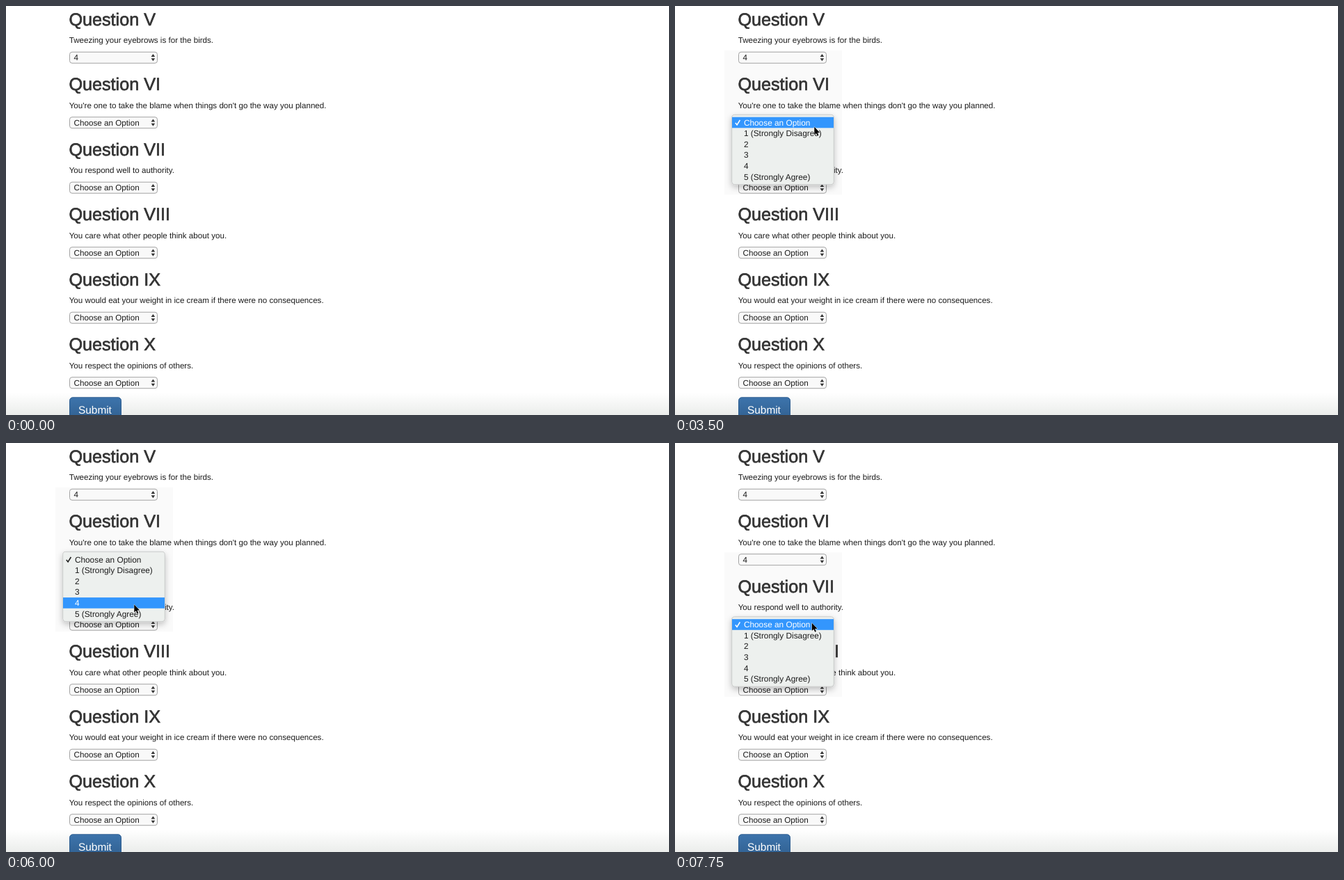
Write an HTML page that moves like this. It is 953 by 588 pixels and loops after 8 s.

```html
<!DOCTYPE html>
<html lang="en">
<head>
<meta charset="utf-8">
<title>Questionnaire</title>
<style>
  html, body { margin: 0; width: 100%; height: 100%; overflow: hidden; background: #fff; }
  svg { display: block; width: 100vw; height: 100vh; }
  text {
    font: 11.63px "Liberation Sans", Arial, sans-serif;
    fill: #1c1c1c; text-rendering: geometricPrecision; white-space: pre;
  }
  .head { font-size: 25.2px; fill: #333; stroke: #333; stroke-width: .7px; }
  .value { font-size: 11.7px; }
  .item { font-size: 11.85px; }
  .submit { font-size: 15.4px; fill: #fff; }
</style>
</head>
<body>
<svg id="stage" viewBox="0 0 953 588" preserveAspectRatio="none">
  <defs>
    <linearGradient id="fade" x1="0" y1="0" x2="0" y2="1">
      <stop offset="0" stop-color="#fff"/>
      <stop offset="1" stop-color="#ebedeb"/>
    </linearGradient>
    <linearGradient id="blue" x1="0" y1="0" x2="0" y2="1">
      <stop offset="0" stop-color="#3d74ac"/>
      <stop offset="1" stop-color="#2e5c8b"/>
    </linearGradient>
    <filter id="shadow" x="-20%" y="-20%" width="140%" height="150%">
      <feDropShadow dx="0" dy="3.5" stdDeviation="4" flood-opacity=".24"/>
    </filter>
  </defs>
</svg>
<script>
const LOOP = 8000, TICK = 250;
const PITCH = 93.5, ITEM = 15.6, LIST_TOP = 66.2;
const CHOOSE = "Choose an Option";
const stage = document.getElementById("stage");

const questions = [
  ["V", "Tweezing your eyebrows is for the birds."],
  ["VI", "You're one to take the blame when things don't go the way you planned."],
  ["VII", "You respond well to authority."],
  ["VIII", "You care what other people think about you."],
  ["IX", "You would eat your weight in ice cream if there were no consequences."],
  ["X", "You respect the opinions of others."]
];
const options = [CHOOSE, "1 (Strongly Disagree)", "2", "3", "4", "5 (Strongly Agree)"];

// Resting points of the pointer; it eases from one to the next
const path = [
  { t: 1250, x: 281, y: 46.5 }, { t: 1500, x: 244.5, y: 111 },
  { t: 2500, x: 200, y: 173.5 }, { t: 3750, x: 200, y: 173.5 },
  { t: 4000, x: 197.5, y: 190 }, { t: 4750, x: 192.5, y: 199 },
  { t: 5500, x: 184, y: 221.5 }, { t: 5750, x: 184, y: 221.5 },
  { t: 6000, x: 184, y: 232 }, { t: 6500, x: 184, y: 231 },
  { t: 7250, x: 196.5, y: 258.5 }
];

const within = (t, from, to) => t >= from && t < to;
const smooth = u => u * u * (3 - 2 * u);

function pointerAt(t) {
  const next = path.findIndex(p => p.t > t);
  if (next < 0) return path[path.length - 1];
  const a = path[Math.max(0, next - 1)], b = path[next];
  const k = smooth(Math.max(0, (t - a.t) / (b.t - a.t || 1)));
  return { x: a.x + (b.x - a.x) * k, y: a.y + (b.y - a.y) * k };
}

function set(el, attrs) {
  for (const key in attrs) el.setAttribute(key, attrs[key]);
}
function add(parent, tag, attrs, content) {
  const el = document.createElementNS("http://www.w3.org/2000/svg", tag);
  set(el, attrs);
  if (content) el.textContent = content;
  return parent.appendChild(el);
}
function show(el, on) {
  el.setAttribute("visibility", on ? "visible" : "hidden");
}
function shift(el, x, y) {
  el.setAttribute("transform", `translate(${x} ${y})`);
}

const backing = add(stage, "rect", { x: 71, width: 169, fill: "#fafafa" });
add(stage, "rect", { x: 0, y: 556, width: 953, height: 32, fill: "url(#fade)" });

const selects = questions.map(([number, statement], i) => {
  const g = add(stage, "g", {});
  shift(g, 0, i * PITCH);
  add(g, "text", { class: "head", x: 90.4, y: 27.6 }, "Question " + number);
  add(g, "text", { x: 90.7, y: 53.2 }, statement);
  const glow = add(g, "rect", { x: 91, y: 65.8, width: 127, height: 16.8, rx: 4,
    fill: "none", stroke: "#b5d2f8", "stroke-width": 2.8 });
  const box = add(g, "rect", { x: 91.5, y: 66.2, width: 126, height: 16, rx: 3.5, fill: "#f9f9f9" });
  const value = add(g, "text", { class: "value", x: 97.5, y: 78 });
  add(g, "path", { d: "M208.6 73.1h5.6l-2.8-4zM208.6 75.3h5.6l-2.8 4z", fill: "#333" });
  return { glow, box, value };
});

add(stage, "rect", { x: 91.5, y: 562.8, width: 74, height: 38, rx: 4.5,
  fill: "url(#blue)", stroke: "#2f5f92" });
add(stage, "text", { class: "submit", x: 104, y: 586.2 }, "Submit");

const menu = add(stage, "g", {});
add(menu, "rect", { x: 81.7, y: 62.8, width: 146.6, height: 100.4, rx: 4,
  fill: "#edf0ee", stroke: "#bfc1c0", "stroke-width": .8, filter: "url(#shadow)" });
const bar = add(menu, "rect", { x: 82, width: 146, height: ITEM, fill: "#3396fd" });
const check = add(menu, "path", { d: "M86.8 74.5l2.3 3 4.3-7", fill: "none", "stroke-width": 1.5 });
const items = options.map((label, i) =>
  add(menu, "text", { class: "item", x: 98.9, y: 78.1 + i * ITEM }, label));

const pointer = add(stage, "path", {
  d: "M.3 .3V11.6L2.9 9.2 4.7 13.3 6.4 12.5 4.6 8.6H8.1Z",
  fill: "#000", stroke: "#fff", "stroke-width": .9, "paint-order": "stroke"
});

function draw(time) {
  const t = Math.floor(time / TICK) * TICK;
  const tip = pointerAt(t);
  show(pointer, t >= path[0].t);
  shift(pointer, tip.x, tip.y);

  const open = t >= 7750 ? 2 : within(t, 3500, 6500) ? 1 : -1;
  const focus = within(t, 2750, 3500) ? 0 : within(t, 6500, 7750) ? 1 : -1;
  selects.forEach(({ glow, box, value }, i) => {
    const on = i === focus;
    show(glow, on);
    set(box, { stroke: on ? "#6ea3ec" : "#a3a3a3", "stroke-width": on ? 1.5 : 1 });
    value.textContent = i === 0 || (i === 1 && t >= 6750) ? "4" : CHOOSE;
  });

  // Part of the backing lingers after the first menu closes
  show(backing, open > 0 || within(t, 6500, 7500));
  set(backing, { y: 63.7 + (open === 2 ? PITCH : 0), height: open > 0 ? 207.5 : 85 });

  // The highlighted option is the one under the pointer
  const active = Math.floor((tip.y - open * PITCH - LIST_TOP) / ITEM);
  show(menu, open > 0);
  shift(menu, 0, open * PITCH);
  set(bar, { y: LIST_TOP + active * ITEM });
  items.forEach((item, i) => { item.style.fill = i === active ? "#fff" : "#1c1c1c"; });
  set(check, { stroke: active === 0 ? "#fff" : "#1c1c1c" });
}

const start = performance.now();
function tick() {
  draw((performance.now() - start) % LOOP);
  requestAnimationFrame(tick);
}
tick();
</script>
</body>
</html>
```
